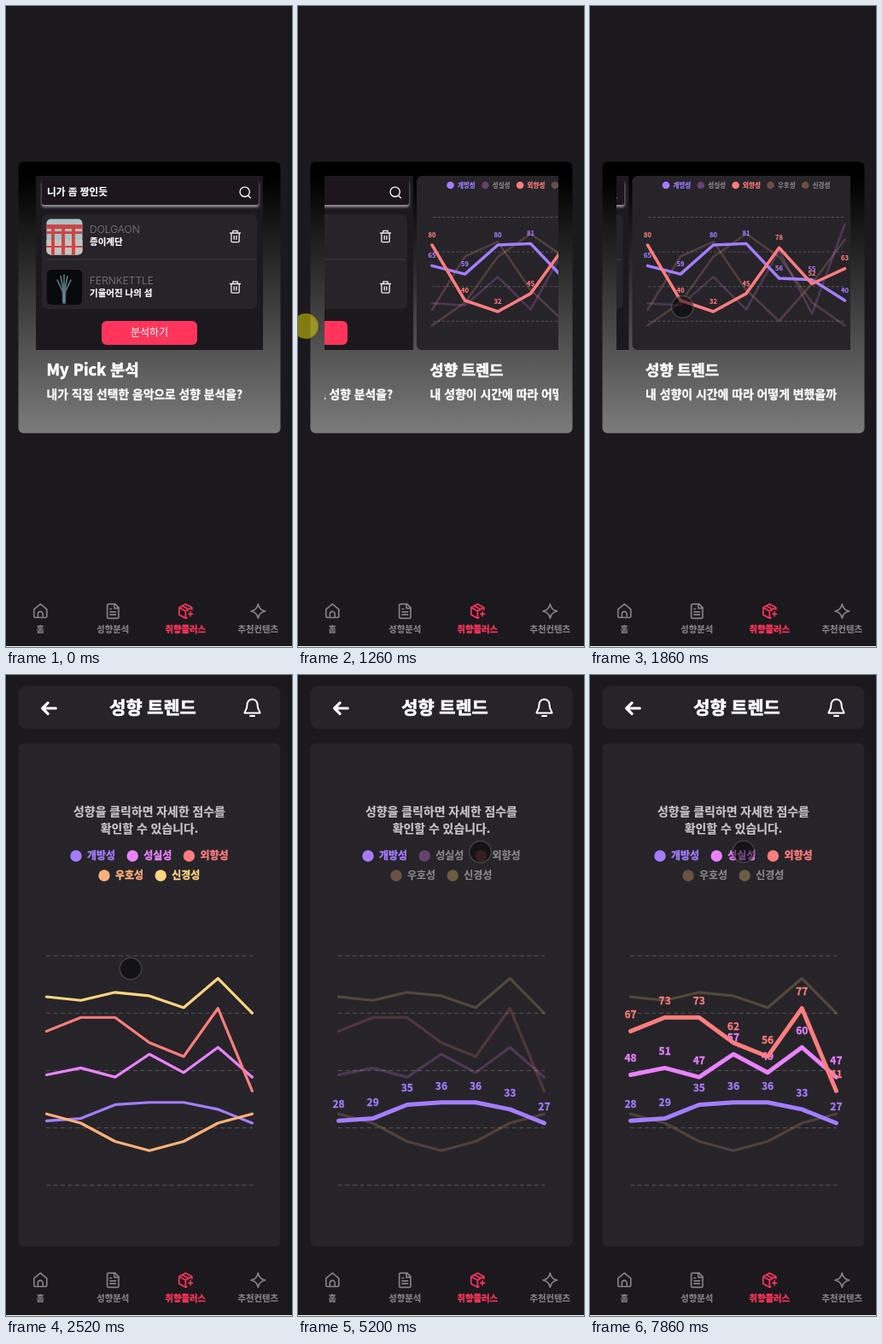
Recreate the animation shown at these times as an HTML page. Size 335 by 751 pixels, loop 8 s.

```html
<!DOCTYPE html>
<html lang="ko">
<head>
<meta charset="utf-8">
<style>
html, body { margin: 0; width: 100%; height: 100%; overflow: hidden; background: #1b191e; }
svg { display: block; }
text { font-family: "Noto Sans CJK KR", "Noto Sans CJK JP", "Noto Sans CJK", sans-serif; }
.mid { text-anchor: middle; }
.artist { font: 300 12px Inter, sans-serif; fill: #807e83; }
.icon { fill: none; stroke-linecap: round; stroke-linejoin: round; }
</style>
</head>
<body>
<svg id="stage" width="335" height="751" viewBox="0 0 335 751"></svg>
<script>
const PANEL = '#262429', PINK = '#ff355c', GREY = '#838186', BACK = '#1b191e';
const NAMES = ['개방성', '성실성', '외향성', '우호성', '신경성'];
const COLORS = ['#a47dff', '#ea82ff', '#ff7d7d', '#ffb17a', '#ffd480'];
const MINI_COLORS = COLORS.map((c, i) => i > 2 ? '#ffa58a' : c);

// Outlines on a 24 unit square
const ICONS = {
  home: 'M3 9.500L12 2l9 7.500V19a2 2 0 0 1-2 2H5a2 2 0 0 1-2-2zM8.500 21v-5a3.500 3.500 0 0 1 7 0v5',
  file: 'M15 2H6q-2 0-2 2v16q0 2 2 2h12q2 0 2-2V7zM14 2v6h6M8 9h2M8 13h8M8 17h8',
  box: 'M21 10V7l-9-5-9 5v10l9 5 2-1M3 7l9 5 9-5M7.500 4.500l9 5M12 12v10M16 16h6M19 13v6',
  spark: 'M12 2Q13.500 10.500 22 12Q13.500 13.500 12 22Q10.500 13.500 2 12Q10.500 10.500 12 2z',
  search: 'M20 11a8 8 0 1 1-17 0a8 8 0 1 1 17 0zM17.500 17.500l4 4',
  trash: 'M3 6h18M19 6v14q0 2-2 2H7q-2 0-2-2V6M8 6V2h8v4M10 11v6M14 11v6',
  bell: 'M6 8a6 6 0 0 1 12 0c0 7 3 7 3 10H3c0-3 3-3 3-10M9.500 21.500h5',
  back: 'M21 12H4M11 5l-7 7 7 7'
};

const icon = (name, x, y, size, color = '#fff', width = 2) =>
  `<path class="icon" d="${ICONS[name]}" stroke="${color}" stroke-width="${width}"
    transform="translate(${x - size / 2} ${y - size / 2}) scale(${size / 24})"/>`;
// A thin outline gives the heavier weights their full colour.
const text = (str, x, y, size, weight = 500, fill = '#fff', cls = '') =>
  `<text x="${x}" y="${y}" font-size="${size}" font-weight="${weight}" fill="${fill}" class="${cls}"
    stroke="${fill}" stroke-width="${(weight - 400) * size / 14000}">${str}</text>`;
const rect = (x, y, w, h, r, fill, extra = '') =>
  `<rect x="${x}" y="${y}" width="${w}" height="${h}" rx="${r}" fill="${fill}" ${extra}/>`;
const range = (n, fn) => Array.from({ length: n }, (_, i) => fn(i));
const grid = (x1, x2, y, gap, n, dash) => range(n, i =>
  `<path d="M${x1} ${y + i * gap}H${x2}" stroke="#555358" stroke-dasharray="${dash}"/>`).join('');

// `state(i)` of a series is 'plain', 'lit' or 'dim'; dim ones lie underneath.
function chart(data, state, o) {
  const px = k => o.x + k * o.step, py = v => o.base - v * o.scale;
  const draw = i => {
    const s = state(i), color = o.colors[i];
    const points = data[i].map((v, k) => px(k) + ',' + py(v)).join(' ');
    const labels = s == 'lit' ? data[i].map((v, k) =>
      text(v, px(k), py(v) - o.lift, o.font, 700, color, 'mid')).join('') : '';
    return `<polyline points="${points}" fill="none" stroke="${color}" stroke-linecap="round" stroke-linejoin="round"
      stroke-width="${s == 'lit' ? o.bold : o.thin}" opacity="${s == 'dim' ? .2 : 1}"/>` + labels;
  };
  return range(data.length, i => i)
    .sort((a, b) => (state(b) == 'dim') - (state(a) == 'dim')).map(draw).join('');
}

const legend = (state, spot, r, gap, drop, size, colors) => NAMES.map((name, i) => {
  const [x, y] = spot(i), dim = state(i) == 'dim';
  return `<circle cx="${x}" cy="${y}" r="${r}" fill="${colors[i]}" opacity="${dim ? .32 : 1}"/>` +
    text(name, x + gap, y + drop, size, dim ? 600 : 800, dim ? '#8b898d' : colors[i]);
}).join('');

const song = (y, artist, title) =>
  `<text class="artist" x="98" y="${y}">${artist}</text>` +
  text(title, 98, y + 14, 10.5, 600) + icon('trash', 268.5, y + 4, 16, '#eee');

const bar = (x, y, w, h) => rect(x, y, w, h, 0, '#cf4546');
const gateCover = `<g clip-path="url(#cover)">${rect(47, 249, 43, 43, 0, '#a9c3c4')}${rect(47, 274, 43, 18, 0, '#c4c3bd')}
  ${bar(47, 256, 43, 5)}${bar(47, 264, 43, 3)}${bar(47, 281, 43, 2)}${range(3, i => bar(53 + i * 12, 257, 4, 35)).join('')}</g>`;
const handCover = rect(48, 309, 41, 41, 5, '#07090b') +
  range(5, i => `<path class="icon" d="M68 338L${60 + i * 4} ${315 + (i - 2) ** 2 * 1.5}" stroke="#617c84" stroke-width="1.6"/>`).join('') +
  `<path class="icon" d="M68 347V336" stroke="#617c84" stroke-width="4"/>`;

const pickSlide = rect(35, 199, 266, 204, 0, BACK) +
  rect(42, 204, 254, 29, 2, BACK, 'filter="url(#glow)"') +
  text('니가 좀 짱인듯', 48, 221.5, 11.7, 600) + icon('search', 280, 218.5, 16) +
  rect(42, 244, 252, 111, 7, PANEL) + rect(48, 296.5, 244, 1, 0, '#3b393e') +
  gateCover + handCover + song(266, 'DOLGAON', '종이계단') + song(325.5, 'FERNKETTLE', '기울어진 나의 섬') +
  rect(112, 369, 112, 28, 6, PINK) + text('분석하기', 168, 387, 12, 500, '#fff', 'mid') +
  text('My Pick 분석', 47.5, 433, 18.3, 900) +
  text('내가 직접 선택한 음악으로 성향 분석을?', 47.5, 460, 13.8, 700);

const miniData = [
  [65, 59, 80, 81, 56, 55, 40],
  range(7, k => 38 + 4 * k + (-1) ** k * 5.5 * k),
  [80, 40, 32, 45, 78, 52, 63],
  range(7, k => 55 - 33 * Math.cos(k * Math.PI / 3)),
  range(7, k => 55 + 30 * Math.cos(1.4 * (k - 1.7)))
];
const miniState = i => i == 0 || i == 2 ? 'lit' : 'dim';
const trendSlide = '<g transform="translate(274)">' + rect(31, 199, 274, 204, 6, PANEL) +
  legend(miniState, i => [70.5 + i * 40.8, 210], 4.3, 8.5, 2.5, 7.5, MINI_COLORS) +
  grid(50, 280, 247.5, 40.6, 4, '3 2.5') +
  chart(miniData, miniState, {
    x: 49, step: 38.5, base: 410, scale: 1.625, lift: 9.3, font: 7.5, bold: 3.5, thin: 2.6, colors: MINI_COLORS
  }) +
  text('성향 트렌드', 46.5, 433, 17.6, 900) +
  text('내 성향이 시간에 따라 어떻게 변했을까', 46.5, 460, 13.9, 700) + '</g>';

const data = [
  [28, 29, 35, 36, 36, 33, 27],
  [48, 51, 47, 57, 49, 60, 47],
  [67, 73, 73, 62, 56, 77, 41],
  range(7, k => 23 + 8 * Math.cos(k * Math.PI / 3)),
  range(7, k => 82 + 1.6 * k * Math.cos(2.4 * (k - 5)))
];
const legendSpot = i => i < 3 ? [82 + i * 66.2, 212] : [115 + (i - 3) * 66.2, 235];

function trend(picked) {
  const state = i => !picked.length ? 'plain' : picked.includes(i) ? 'lit' : 'dim';
  return legend(state, legendSpot, 6.7, 13, 4, 12, COLORS) + chart(data, state, {
    x: 47.5, step: 40.15, base: 597.6, scale: 2.69, lift: 15, font: 12, bold: 5, thin: 3.2, colors: COLORS
  });
}

const tabs = { home: '홈', file: '성향분석', box: '취향플러스', spark: '추천컨텐츠' };
const nav = Object.entries(tabs).map(([name, label], i) => {
  const active = name == 'box', color = active ? PINK : GREY, x = 40.3 + i * 85;
  return icon(name, x, 709, 20, color, 2) + text(label, x, 734, 10.3, active ? 900 : 600, color, 'mid');
}).join('');

stage.innerHTML = `<defs>
  <linearGradient id="fade" x2="0" y2="1"><stop offset=".06" stop-color="#000"/><stop offset=".4" stop-color="#2c2c2c"/><stop offset="1" stop-color="#7b7b7b"/></linearGradient>
  <clipPath id="window">${rect(31, 183, 274, 317, 0, '')}</clipPath>
  <clipPath id="cover">${rect(47.5, 249.5, 42, 42, 5, '')}</clipPath>
  <filter id="glow" x="-10%" y="-30%" width="120%" height="180%"><feDropShadow dx="0" dy="2.5" stdDeviation="1.5" flood-color="#9a989c"/></filter>
</defs>
${rect(0, 0, 335, 751, 0, BACK)}${rect(0, 750, 335, 1, 0, '#fff')}
<g id="home">${rect(14.5, 182.5, 307, 318, 6, 'url(#fade)')}
  <g clip-path="url(#window)"><g id="strip">${pickSlide}${trendSlide}</g></g></g>
<g id="detail">${rect(14.5, 13, 307, 50, 9, PANEL)}${rect(14.5, 80, 307, 589.5, 6, PANEL)}
  ${icon('back', 50, 39, 22, '#fff', 3.5)}${icon('bell', 288.5, 38.5, 24)}
  ${text('성향 트렌드', 172, 45.5, 20.8, 900, '#fff', 'mid')}
  ${text('성향을 클릭하면 자세한 점수를', 168, 164.5, 13.9, 600, '#c8c6c9', 'mid')}
  ${text('확인할 수 있습니다.', 168, 184.5, 13.9, 600, '#c8c6c9', 'mid')}
  ${grid(47, 289, 329, 67.2, 5, '5 3.5')}
  <g id="plot"></g></g>
${nav}
<circle id="cursor" stroke-width="1.5"/>`;

const [home, detail, strip, plot, cursor] =
  ['home', 'detail', 'strip', 'plot', 'cursor'].map(id => document.getElementById(id));

const clamp = v => Math.min(1, Math.max(0, v));
const easeOut = (p, power) => 1 - (1 - clamp(p)) ** power;

// Pointer moves: start, duration, x, y
const moves = [
  [60, 480, 165, 357], [740, 520, 9, 375], [1590, 530, 146, 344], [2860, 410, 293, 262],
  [3270, 400, 118, 213], [4590, 960, 232, 206], [6400, 260, 224, 212], [6800, 520, 180, 207]];
// Release times of taps, with the series they light up
const taps = [[2520], [4060, 0], [5800, 2], [7860, 1]];
const DRAG = 740, DROP = 1590, OPEN = taps[0][0];

function pointer(t) {
  let x = 283, y = 677;
  for (const [start, time, toX, toY] of moves) {
    const p = easeOut((t - start) / time, 1.8);
    x += (toX - x) * p;
    y += (toY - y) * p;
  }
  return [x, y];
}

function stripOffset(t, x) {
  if (t < DRAG) return 0;
  if (t < DROP) return (x - 165) * 1.064;
  return -166 - 108 * easeOut((t - 1650) / 360, 2);
}

let shown;
function render(t) {
  const [x, y] = pointer(t);
  const down = t >= DRAG && t < DROP || taps.some(([end]) => t >= end - 140 && t < end);
  home.style.display = t < OPEN ? '' : 'none';
  detail.style.display = t < OPEN ? 'none' : '';
  strip.setAttribute('transform', `translate(${stripOffset(t, x)})`);
  const picked = taps.slice(1).filter(tap => t >= tap[0]).map(tap => tap[1]);
  if (shown !== picked.join()) {
    shown = picked.join();
    plot.innerHTML = trend(picked);
  }
  const look = {
    cx: x, cy: y, r: down ? 14.3 : 12.7, opacity: t < 70 ? 0 : 1,
    fill: down ? 'rgba(255,245,0,.45)' : 'rgba(0,0,0,.5)',
    stroke: down ? 'rgba(160,150,0,.6)' : 'rgba(110,108,112,.45)'
  };
  for (const key in look) cursor.setAttribute(key, look[key]);
}

const start = performance.now();
(function tick() {
  render((performance.now() - start) % 8000);
  requestAnimationFrame(tick);
})();
</script>
</body>
</html>
```
